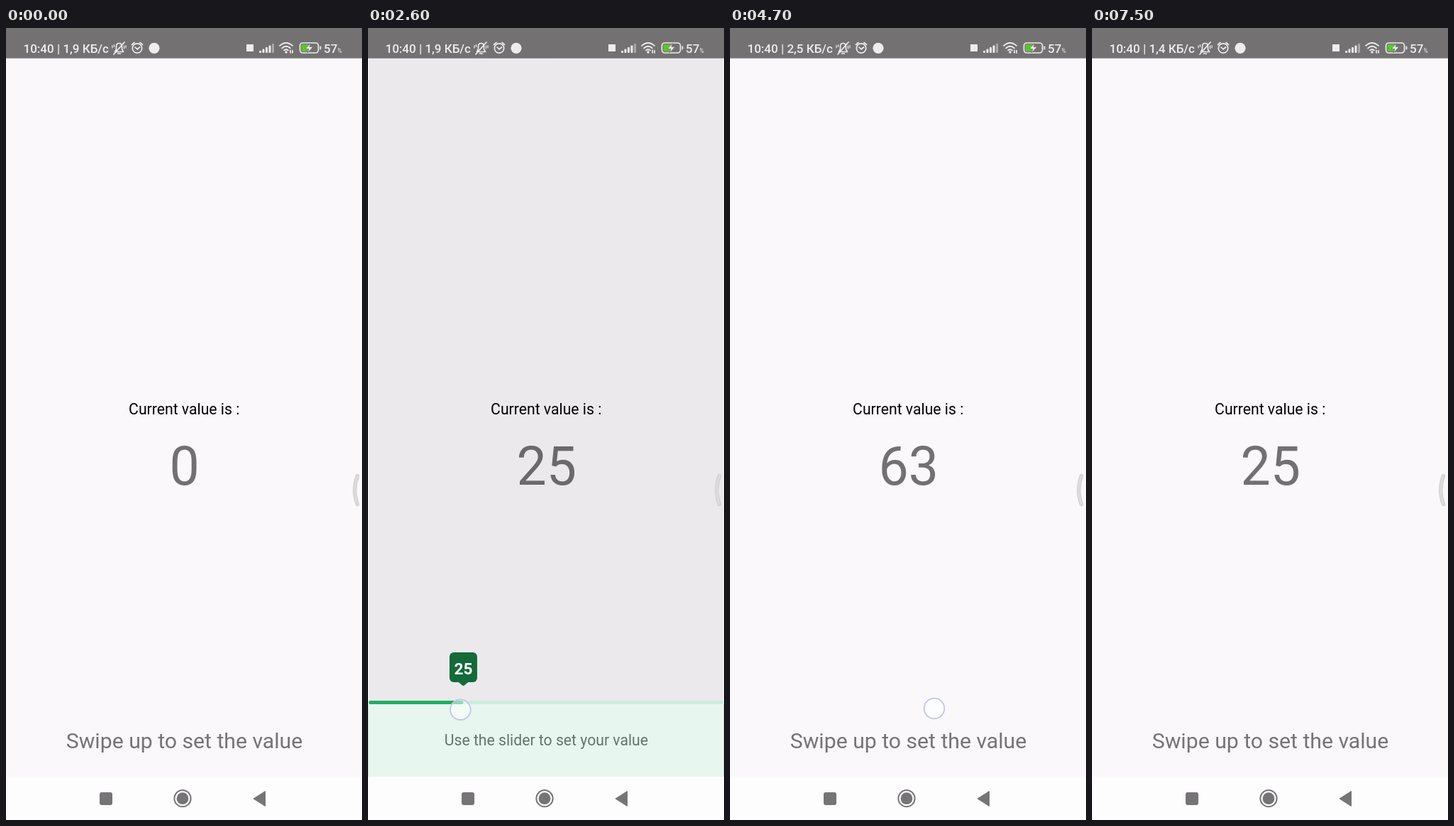
Write an HTML page that moves like this. It is 502 px wide and 1115 px high and loops after 8000 ms.

```html
<!DOCTYPE html>
<html lang="en">
<head>
<meta charset="utf-8">
<title>Slider sheet</title>
<style>
html, body { margin: 0; width: 100%; height: 100%; overflow: hidden; background: #fbf8fc; }
svg { display: block; width: 502px; height: 1115px; font-family: Roboto, "Noto Sans", sans-serif; }
.mid { text-anchor: middle; }
.line { fill: none; stroke: #eeedee; stroke-width: 1.7; stroke-linecap: round; stroke-linejoin: round; }
.status { font-size: 17px; font-weight: 500; }
.edge { fill: none; stroke-linecap: round; }
</style>
</head>
<body>
<svg viewBox="0 0 502 1115">
  <defs>
    <clipPath id="app"><rect y="42" width="502" height="1012"/></clipPath>
  </defs>
  <rect width="502" height="1115" fill="#fbf8fc"/>

  <g clip-path="url(#app)">
    <text class="mid" x="251.2" y="544" font-size="21.2">Current value is :</text>
    <text id="value" class="mid" x="251.7" y="643" font-size="75.2" fill="#717073">0</text>
    <text class="mid" x="251.5" y="1014" font-size="30.2" fill="#747376">Swipe up to set the value</text>
    <rect id="scrim" x="1" y="42" width="500" height="1012" fill="#000"/>

    <g id="sheet">
      <rect y="952" width="502" height="240" fill="#d9dfdc"/>
      <rect x="1" y="949" width="500" height="240" fill="#e7f7ef"/>
      <rect x="1" y="947" width="500" height="5" fill="#cdecdc"/>
      <rect id="fill" x="1" y="947" width="0" height="5" rx="2.5" fill="#22ae62"/>
      <text class="mid" x="251.4" y="1010.3" font-size="21.2" fill="#66736c">Use the slider to set your value</text>
      <g id="thumb">
        <path id="tip" d="M-8 41H8L2 46Q0 48 -2 46Z" fill="#146a39"/>
        <rect id="box" height="42" rx="6" fill="#146a39"/>
        <text id="label" class="mid" y="30.5" font-size="22.6" font-weight="700" fill="#fff">0</text>
      </g>
    </g>
  </g>

  <path class="edge" d="M495.5 630.5Q488 651 495.5 670.5" stroke="#cfced1" stroke-width="5.4"/>
  <path class="edge" d="M495.5 630.5Q488 651 495.5 670.5" stroke="#dcdbdd" stroke-width="3.4"/>

  <!-- navigation bar -->
  <rect y="1054" width="502" height="61" fill="#fefdfe"/>
  <g fill="#767476">
    <rect x="132" y="1076" width="18" height="18" rx="3"/>
    <circle cx="249" cy="1084.7" r="11.6" fill="none" stroke="#767476" stroke-width="2"/>
    <circle cx="249" cy="1084.7" r="8.4"/>
    <path d="M349 1085L365.5 1074.5V1095.5Z" stroke="#767476" stroke-linejoin="round"/>
  </g>

  <!-- status bar -->
  <rect width="502" height="42.7" fill="#747173"/>
  <g fill="#eeedee">
    <text id="clock" class="status" x="24.5" y="35"></text>
    <g class="line">
      <path d="M153.5 33.5H165.5L163.5 30V26Q163.5 21.5 159.5 21.5T155.5 26V30ZM157.5 36H161.5M152 37L167 20"/>
      <path d="M150 24.5V28M152.5 23.5V26.5M166.5 25V29M169 24.5V28" stroke-width="1.2"/>
      <circle cx="185" cy="28.5" r="6.7"/>
      <path d="M182 27L185 30L188.5 27M177.5 23.5L181 20.5M192.5 23.5L189 20.5"/>
    </g>
    <circle cx="209" cy="28.3" r="7.6"/>
    <rect x="339" y="23" width="10" height="10"/>
    <g id="bars"></g>
    <g class="line">
      <path d="M386 25Q395 17 404 25M389 28.5Q395 23 401 28.5M392 31.5Q395 29 398 31.5"/>
      <path d="M401 35V31.5M404 31.5V35"/>
      <rect x="414.5" y="21" width="26" height="14" rx="4"/>
    </g>
    <circle cx="395" cy="34" r="1.7"/>
    <path d="M418 23H429V33H418Q416.5 33 416.5 31V25Q416.5 23 418 23Z" fill="#5bc52f"/>
    <rect x="442.5" y="25.5" width="1.8" height="5" rx=".8"/>
    <path d="M429.5 21.5L422 29.5H427L425 35L433 26.5H428Z" stroke="#747173" stroke-width=".8"/>
    <text class="status" x="448" y="35">57</text>
    <text x="467.5" y="35" font-size="8.5">%</text>
  </g>

  <circle id="touch" r="14.3" fill="#fff" fill-opacity=".5" stroke="#bfc6e6" stroke-width="1.8"/>
</svg>
<script>
const LOOP = 8000, STEP = 100;
const REST = 930, PRESSED = 937, RAISED = 879;
const SPEEDS = ['1,9', '2,5', '1,4'];

const el = id => document.getElementById(id);
const set = (id, attrs) => {
  for (const key in attrs) el(id).setAttribute(key, attrs[key]);
};
const ramp = (t, start, ms) => Math.min(1, Math.max(0, (t - start) / ms));
const smooth = p => p * p * (3 - 2 * p);
const easeOut = p => 1 - (1 - p) ** 2.4;
const mix = (a, b, p) => a + (b - a) * p;

const swipe = (at, opens) => opens > 0
  ? { at, opens, ms: 250, from: [288, 958], to: [295, 820] }
  : { at, opens, ms: 250, from: [255, 972], to: [258, 1062] };
const drag = (at, ms, from, to, values) => ({ at, ms, from, to, values });

const gestures = [
  swipe(1000, 1),
  drag(2300, 700, [15, 953], [308, 970], [0, 63]),
  swipe(3500, -1),
  swipe(4700, 1),
  drag(5800, 400, [308, 952], [153.5, 968], [64, 25]),
  swipe(6700, -1)
];
const swipes = gestures.filter(g => g.opens);
const drags = gestures.filter(g => g.values);

// The finger stays down briefly after each movement.
const release = g => g.at + g.ms + 50;
const progress = (g, t) => smooth(ramp(t, g.at, g.ms));
const latest = (list, t) => list.filter(g => t >= g.at).pop();

function drawTouch(t) {
  const g = latest(gestures, t);
  if (!g) return set('touch', { opacity: 0 });
  const p = progress(g, t);
  set('touch', {
    cx: mix(g.from[0], g.to[0], p),
    cy: mix(g.from[1], g.to[1], p),
    opacity: 1 - ramp(t, release(g), 100)
  });
}

function drawThumb(t) {
  const g = latest(drags, t);
  const held = g && t < release(g);
  const value = g ? mix(...g.values, progress(g, t)) : 0;
  const top = !g ? REST
    : held ? mix(PRESSED, RAISED, smooth(ramp(t, g.at, 300)))
    : mix(RAISED, REST, smooth(ramp(t, release(g), 250)));

  const shown = Math.round(value);
  const width = shown < 10 ? 26 : 39;
  const center = 1.5 + value * 4.575 + width / 2;
  set('thumb', { transform: `translate(${center} ${top})` });
  set('box', { x: -width / 2, width });
  set('tip', { opacity: held ? 1 : 0 });
  set('fill', { width: value > 0 ? center - 1 : 0 });
  el('label').textContent = el('value').textContent = shown;
}

function drawSheet(t) {
  const open = swipes.reduce((sum, g) => sum + g.opens * easeOut(ramp(t, g.at + 100, 500)), 0);
  set('scrim', { opacity: open * .06 });
  set('sheet', { transform: `translate(0 ${(1 - open) * 130})` });
}

function render(time) {
  const t = Math.floor(time % LOOP / STEP) * STEP;
  el('clock').textContent = `10:40 | ${SPEEDS[Math.floor((t + 500) / 4000)]} КБ/с`;
  drawSheet(t);
  drawThumb(t);
  drawTouch(t);
}

for (let i = 0; i < 5; i++) {
  const h = 3 + 2.5 * i;
  el('bars').innerHTML +=
    `<rect x="${357 + i * 4.5}" y="${35 - h}" width="3" height="${h}" rx="1" opacity="${i < 4 ? 1 : .45}"/>`;
}

const start = performance.now();
function tick() {
  render(performance.now() - start);
  requestAnimationFrame(tick);
}
tick();
</script>
</body>
</html>
```
